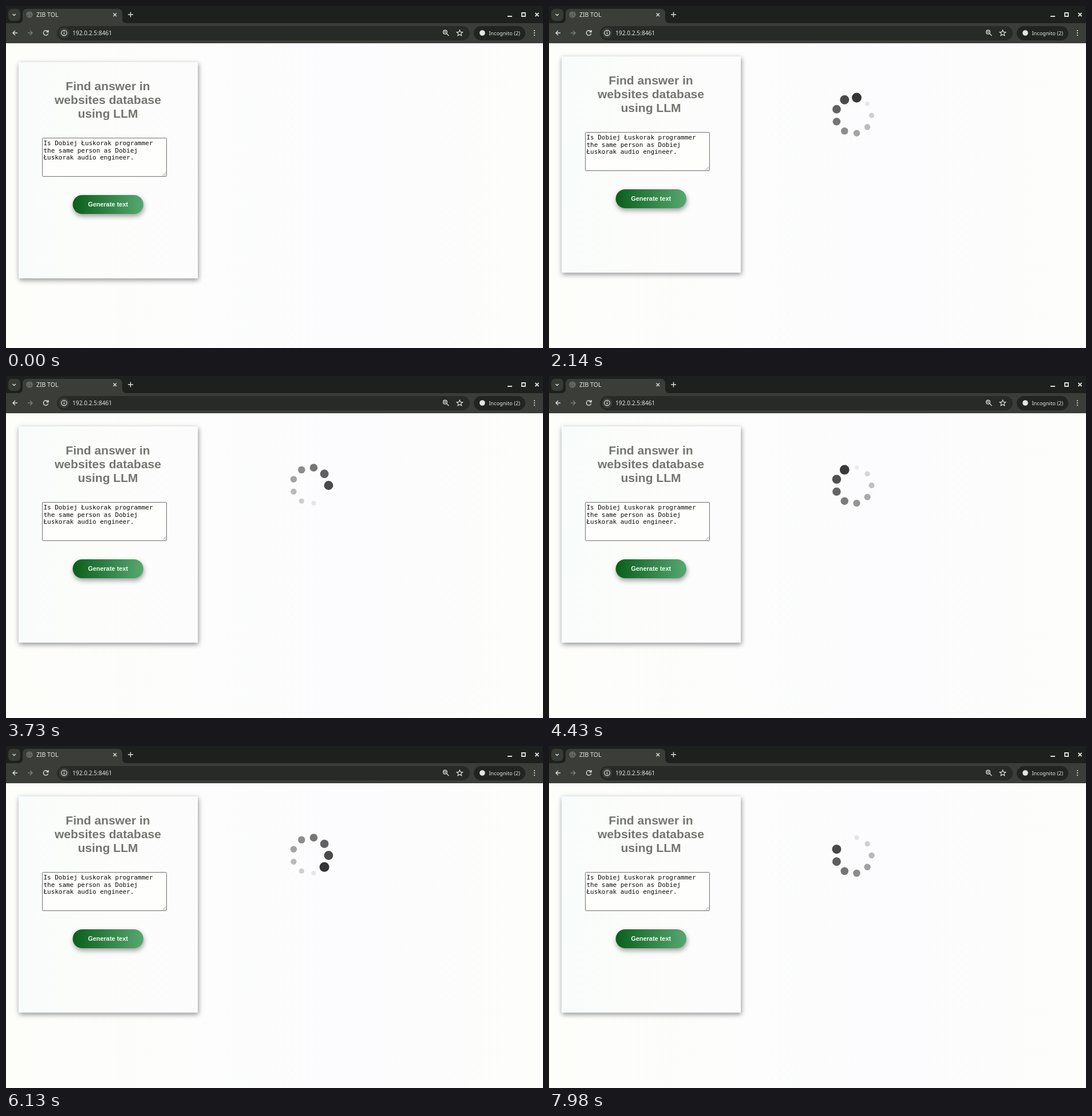
Animation of 938x597 px, one loop 8 s. Source, as an HTML page:

```html
<!DOCTYPE html>
<html lang="en">
<head>
<meta charset="utf-8">
<title>Answer finder</title>
<style>
  html, body { margin: 0; width: 100%; height: 100%; overflow: hidden; background: #fdfdfb; }
  svg { display: block; }
  .ui { font-family: "Noto Sans", "Open Sans", sans-serif; fill: #e4e6e0; }
  .heading { font: bold 21.05px "Liberation Sans", Arial, sans-serif; fill: #747570; text-anchor: middle; }
  .query { font: 10.95px "DejaVu Sans Mono", monospace; fill: #0a0a0a; }
  .label { font: bold 10.95px "Liberation Sans", Arial, sans-serif; fill: #f4fbf3; text-anchor: middle; }
  .icon { fill: none; stroke: #dddfd9; stroke-width: 1.4; }
  .panel { filter: drop-shadow(1px 3px 4px rgba(20, 20, 30, .48)); }
  .button { filter: drop-shadow(1px 4px 4px rgba(0, 0, 0, .38)); }
</style>
</head>
<body>
<svg width="938" height="597" viewBox="0 0 938 597">
  <defs>
    <linearGradient id="page">
      <stop stop-color="#fdfefa"/><stop offset=".65" stop-color="#fcfcfe"/><stop offset="1" stop-color="#fdfdfb"/>
    </linearGradient>
    <linearGradient id="paper">
      <stop stop-color="#f8fcfa"/><stop offset=".4" stop-color="#fcfdfb"/><stop offset="1" stop-color="#fdfcfd"/>
    </linearGradient>
    <linearGradient id="green">
      <stop stop-color="#0b5f1a"/><stop offset="1" stop-color="#56a870"/>
    </linearGradient>
  </defs>
  <rect y="65" width="938" height="532" fill="url(#page)"/>

  <!-- Browser window -->
  <rect width="938" height="31" fill="#1e201d"/>
  <rect y="30" width="938" height="35" fill="#3b3d39"/>
  <path d="M21 30q8 0 8-8V13q0-8 8-8H195q8 0 8 8v9q0 8 8 8z" fill="#3b3d39"/>
  <rect x="4" y="5" width="21" height="21" rx="6.5" fill="#383a36"/>
  <g fill="#282a27">
    <rect x="89" y="35" width="721" height="25" rx="12.5"/>
    <rect x="817" y="35" width="90" height="25" rx="12.5" fill="#222421"/>
  </g>
  <circle cx="101.500" cy="47" r="9" fill="#3b3d39"/>
  <g class="icon">
    <path d="M11.500 14l2.700 2.600 2.700-2.600"/>
    <path d="M187.500 12.500l5.500 5.500m0-5.500l-5.500 5.500"/>
    <path d="M213 15h9m-4.500-4.500v9"/>
    <path d="M876 18h8" stroke-width="2"/>
    <path d="M901 12h6v6h-6z" stroke-width="1.800"/>
    <path d="M924.500 12l6 6m0-6l-6 6" stroke-width="1.800"/>
    <path d="M20 47h-8m4-4l-4 4 4 4"/>
    <path d="M38 47h8m-4-4l4 4-4 4" stroke="#7c7e79"/>
    <path d="M73 44.500a4.200 4.200 0 1 0 .6 3.600M74 42v3.500h-3.500"/>
    <circle cx="101.500" cy="47" r="4.700" stroke-width="1.200"/>
    <path d="M101.500 46.500v3m0-5.500v1.300"/>
    <circle cx="767" cy="45.500" r="3.300"/>
    <path d="M769.500 48l4 4M765.500 45.500h3m-1.500-1.500v3" stroke-width="1.200"/>
    <path d="M792.500 42l1.500 3.400 3.700.3-2.800 2.400.9 3.600-3.300-1.900-3.300 1.900.9-3.600-2.800-2.400 3.700-.3z" stroke-width="1.200"/>
    <g stroke="#72746f" stroke-width="1.200">
      <circle cx="41" cy="15" r="5" fill="#555752"/>
      <path d="M36.500 13.500q4 0 4.500 3t2 3M40 10.500q0 3 3 3t2.500 3"/>
    </g>
  </g>
  <g class="ui">
    <circle cx="923" cy="43" r="1.100"/><circle cx="923" cy="47" r="1.100"/><circle cx="923" cy="51" r="1.100"/>
    <circle cx="832" cy="47" r="4.800"/>
    <text x="53" y="18.500" font-size="10.500">ZIB TOL</text>
    <text x="116" y="51" font-size="10.200">192.0.2.5:8461</text>
    <text x="843.500" y="50.500" font-size="9.200">Incognito (2)</text>
  </g>

  <!-- Search form -->
  <g id="card">
    <rect class="panel" x="22" y="98" width="313" height="377.500" fill="url(#paper)"/>
    <g class="heading">
      <text x="178" y="147">Find answer in</text>
      <text x="178" y="171">websites database</text>
      <text x="178" y="195">using LLM</text>
    </g>
    <rect x="63.500" y="230.500" width="217" height="67" rx="1" fill="#fefefd" stroke="#70726f"/>
    <path d="M273.500 296.500l6-6m-2.500 6l2.500-2.500" stroke="#777" stroke-width=".8"/>
    <g class="query">
      <text x="65.500" y="243">Is Dobiej Łuskorak programmer</text>
      <text x="65.500" y="255.700">the same person as Dobiej</text>
      <text x="65.500" y="268.400">Łuskorak audio engineer.</text>
    </g>
    <rect class="button" x="116.500" y="330" width="123.500" height="33" rx="16.500" fill="url(#green)"/>
    <text class="label" x="178.200" y="350">Generate text</text>
  </g>

  <g id="spinner" fill="#333"></g>
</svg>
<script>
  const LOOP = 8000, SUBMIT = 1200;
  const DOTS = 9, SPIN = 1197, SPIN_START = 1205;
  const card = document.getElementById('card');
  const spinner = document.getElementById('spinner');

  const dots = Array.from({ length: DOTS }, (_, i) => {
    const dot = document.createElementNS(spinner.namespaceURI, 'circle');
    const angle = i / DOTS * 2 * Math.PI;
    dot.setAttribute('cx', 532 + 31.5 * Math.cos(angle));
    dot.setAttribute('cy', 191 + 31.5 * Math.sin(angle));
    return spinner.appendChild(dot);
  });

  const start = performance.now();

  function draw(now) {
    const t = Math.max(0, now - start) % LOOP;
    const loading = t >= SUBMIT;
    card.setAttribute('transform', `translate(0 ${loading ? -10 : 0})`);
    spinner.setAttribute('visibility', loading ? 'visible' : 'hidden');

    // Each dot shrinks and fades over one turn, then snaps back to full.
    dots.forEach((dot, i) => {
      const turn = (t - SPIN_START) / SPIN - i / DOTS;
      const age = turn - Math.floor(turn);
      dot.setAttribute('r', 8.5 - 5 * age);
      dot.setAttribute('opacity', 1 - age);
    });
    requestAnimationFrame(draw);
  }
  draw(start);
</script>
</body>
</html>
```
